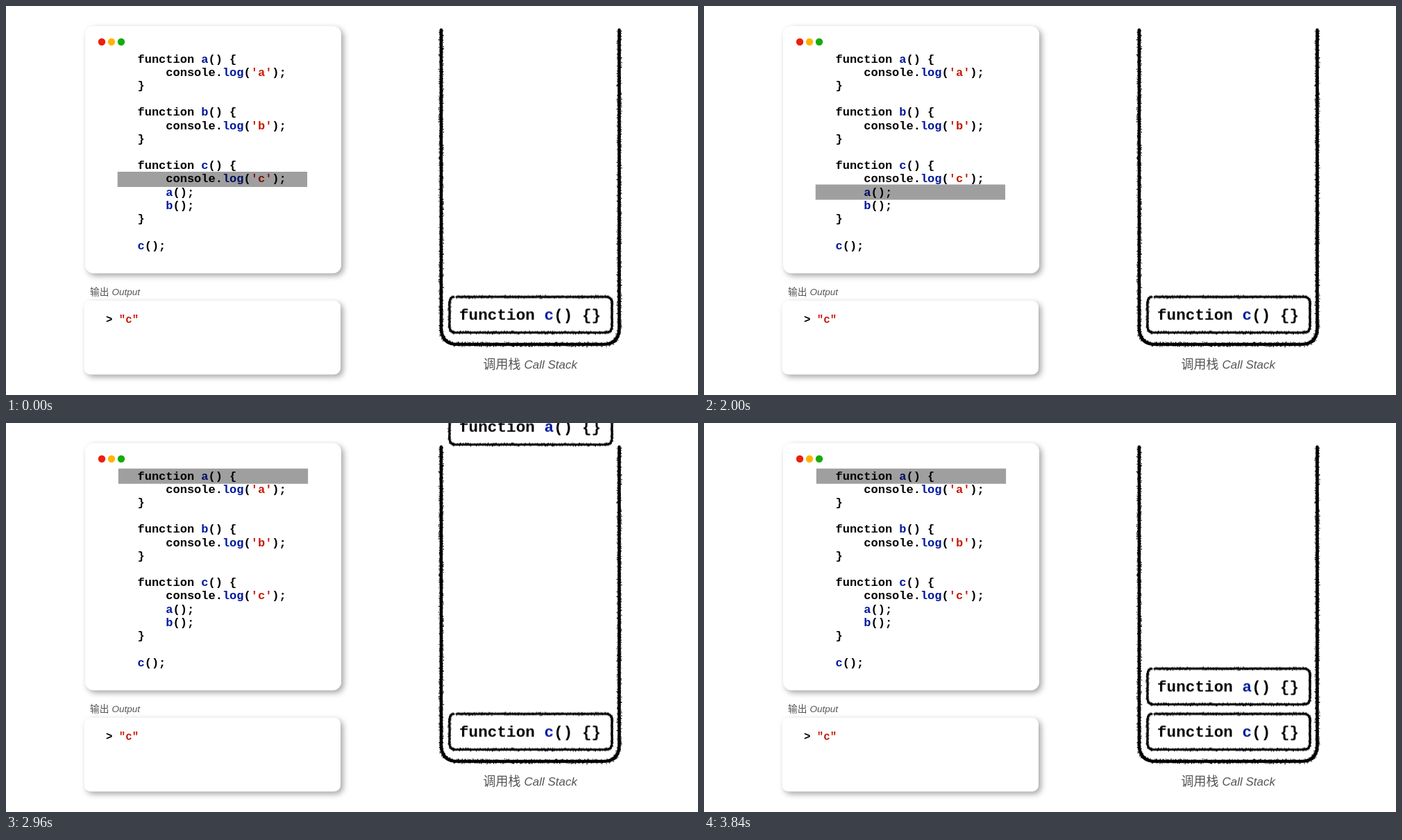
Animation, 997 px wide and 561 px high, one loop 4.36 s. Source, as an HTML page with a canvas:

```html
<!DOCTYPE html>
<html lang="zh">
<head>
<meta charset="utf-8">
<title>Call Stack</title>
<style>
  html, body { margin: 0; width: 100%; height: 100%; overflow: hidden; background: #fff; }
  canvas { display: block; }
</style>
</head>
<body>
<canvas id="stage" width="997" height="561"></canvas>
<script>
const W = 997, H = 561, LOOP = 4360, STEP = 40, MOVE = 960;
const BLACK = '#000', BLUE = '#00199b', RED = '#c81a08';
const MONO = '"Liberation Mono", "Courier New", monospace';
const LATIN = '"Liberation Sans", Arial, sans-serif';
const CJK = '"Noto Sans CJK SC", "Noto Sans CJK", sans-serif';
const ctx = document.getElementById('stage').getContext('2d');

function layer(w, h, paint) {
  const c = document.createElement('canvas');
  c.width = w;
  c.height = h;
  paint(c.getContext('2d'));
  return c;
}

function seeded(seed) {
  return () => {
    seed = (seed * 1664525 + 1013904223) % 4294967296;
    return seed / 4294967296;
  };
}

function card(g, x, y, w, h, r) {
  g.save();
  g.shadowColor = 'rgba(0,0,0,.36)';
  g.shadowBlur = 9;
  g.shadowOffsetX = g.shadowOffsetY = 3.5;
  g.fillStyle = '#fff';
  g.beginPath();
  g.roundRect(x, y, w, h, r);
  g.fill();
  g.restore();
}

function dot(g, x, y, r, color) {
  g.fillStyle = color;
  g.beginPath();
  g.arc(x, y, r, 0, Math.PI * 2);
  g.fill();
}

// Chalk-like line: a solid core with random specks along its edges.
function chalk(g, d, core, spread, seed) {
  const rnd = seeded(seed);
  const path = document.createElementNS('http://www.w3.org/2000/svg', 'path');
  path.setAttribute('d', d);
  g.strokeStyle = g.fillStyle = BLACK;
  g.lineWidth = core;
  g.lineCap = 'round';
  g.stroke(new Path2D(d));
  const length = path.getTotalLength();
  for (let s = 0; s < length; s += 0.9) {
    const p = path.getPointAtLength(s);
    for (let i = 0; i < 2; i++) {
      const angle = rnd() * Math.PI * 2, reach = spread * Math.sqrt(rnd());
      const size = 0.7 + rnd() * 0.7;
      g.fillRect(p.x + Math.cos(angle) * reach - size / 2,
                 p.y + Math.sin(angle) * reach - size / 2, size, size);
    }
  }
}

// Strings are red, called or declared names are blue, the rest is black.
function code(g, text, x, y, size) {
  g.font = `bold ${size}px ${MONO}`;
  for (const part of text.match(/'.'|".*"|\b(?:log|[abc])\b|[^'"]+?(?=\b(?:log|[abc])\b|['"]|$)/g)) {
    g.fillStyle = /^['"]/.test(part) ? RED : /^(log|[abc])$/.test(part) ? BLUE : BLACK;
    g.fillText(part, x, y);
    x += g.measureText(part).width;
  }
}

function label(g, chinese, english, x, x2, y, size, size2) {
  g.fillStyle = '#555';
  g.font = `300 ${size}px ${CJK}`;
  g.fillText(chinese, x, y);
  g.font = `italic ${size2}px ${LATIN}`;
  g.fillText(english, x2, y);
}

const declare = name => [`function ${name}() {`, `    console.log('${name}');`];
const lines = [
  ...declare('a'), '}', '',
  ...declare('b'), '}', '',
  ...declare('c'), '    a();', '    b();', '}', '',
  'c();'
];

const frameBox = name => layer(260, 80, g => {
  chalk(g, 'M24 15 H239 Q248 15 248 24 V58 Q248 66.5 239 66.5 H23 Q14 66.5 14 58 V24 Q14 15 20 15',
        3, 2.4, 7);
  code(g, `function ${name}() {}`, 28, 47.5, 22.7);
});
const boxA = frameBox('a'), boxC = frameBox('c');

const scene = layer(W, H, g => {
  g.fillStyle = '#fff';
  g.fillRect(0, 0, W, H);
  card(g, 114, 29, 369, 356.5, 12);
  card(g, 112.5, 425, 369.5, 106.5, 9);
  ['#ed1f0d', '#ffb400', '#16ab0b'].forEach((color, i) => dot(g, 138 + 14 * i, 51.7, 5.2, color));
  lines.forEach((line, i) => line && code(g, line, 189.5, 81.5 + 19.22 * i, 17));
  code(g, '> "c"', 144, 456.8, 15.7);
  label(g, '输出', 'Output', 121, 152.5, 417, 13.7, 13.5);
  label(g, '调用栈', 'Call Stack', 687.5, 746.5, 523, 18, 17);
  chalk(g, 'M627 34.5 V464 Q627 488 651 488 H860 Q883.5 488 883.5 464 V34.5', 4.5, 3.7, 31);
  g.drawImage(boxC, 625, 404.5);
});

const progress = (t, start) => Math.min(1, Math.max(0, (t - start) / MOVE));
const easeInOut = p => (1 - Math.cos(Math.PI * p)) / 2;
const easeOut = p => Math.sin(Math.PI * p / 2);

function draw(t) {
  const down = easeInOut(progress(t, 490));
  const up = easeInOut(progress(t, 1930));
  const drop = progress(t, 2885);
  ctx.drawImage(scene, 0, 0);
  ctx.fillStyle = 'rgba(0,0,0,.375)';
  ctx.fillRect(160.7 + up * 1.1, 239 + 21 * down - 194.3 * up, 273.3, 22);
  if (drop > 0) ctx.drawImage(boxA, 625, 339.3 - 427 * (1 - easeOut(drop)));
}

const begin = performance.now();
function tick() {
  const t = (performance.now() - begin) % LOOP;
  draw(Math.floor(t / STEP) * STEP);
  requestAnimationFrame(tick);
}
tick();
</script>
</body>
</html>
```
